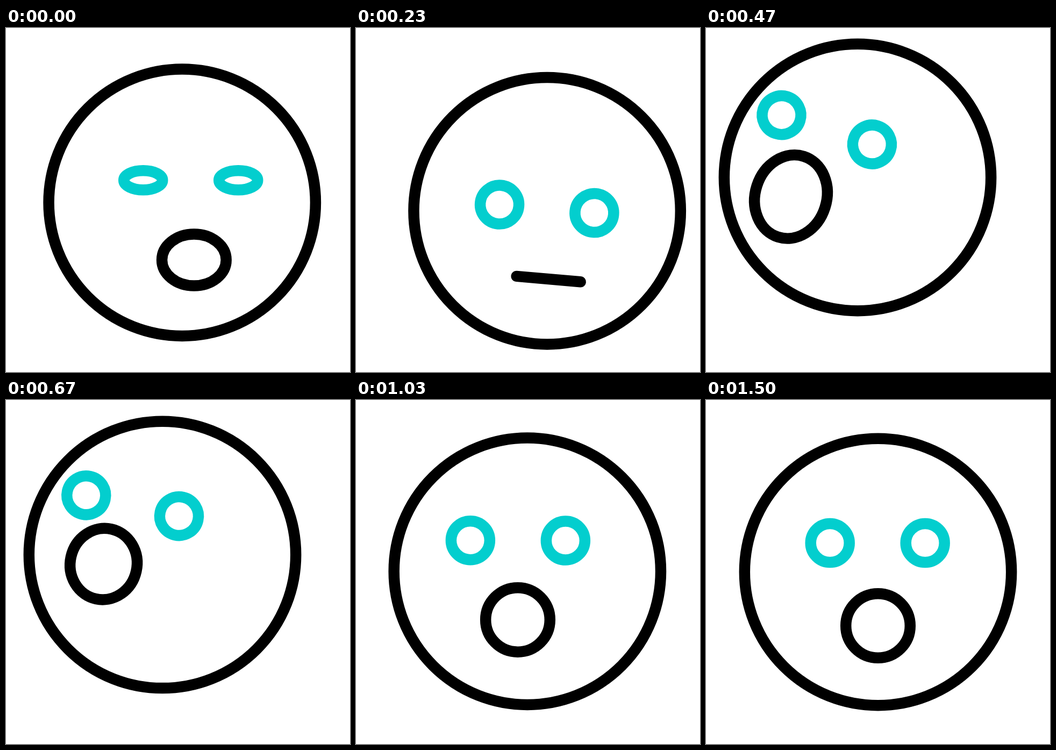
These frames come from a looping animation (640 by 640 pixels, 1.67 s). An HTML page with a canvas:

```html
<!DOCTYPE html>
<html lang="en">
<head>
<meta charset="utf-8">
<title>Yawning face</title>
<style>
html, body { margin: 0; width: 100%; height: 100%; overflow: hidden; background: #fff; }
canvas { display: block; width: 640px; height: 640px; }
</style>
</head>
<body>
<canvas id="stage"></canvas>
<script>
const LOOP = 1670, STEP = 100 / 3;
const INK = '#000', TEAL = '#03cece';
const canvas = document.getElementById('stage');
const ctx = canvas.getContext('2d');
const ratio = window.devicePixelRatio || 1;
canvas.width = canvas.height = 640 * ratio;

const clamp = v => Math.min(1, Math.max(0, v));
const smooth = u => u * u * (3 - 2 * u);
const late = power => u => 1 - (1 - u * u) ** power;

// Keys are [time, value, ease into this key]; time counts steps of 1/30 s.
function tween(k, ...keys) {
  let value = keys[0][1];
  for (let i = 1; i < keys.length; i++) {
    const [from] = keys[i - 1];
    const [to, goal, ease = smooth] = keys[i];
    value += (goal - value) * ease(clamp((k - from) / (to - from)));
  }
  return value;
}

// The head dips to the lower right, swings to the upper left and settles;
// the features follow further, each with its own lag.
function pose(k) {
  const gape = tween(k, [7, 0], [14, 1], [24, 0]);
  const shut = tween(k, [-2, 1], [5, 0], [7, 0], [14, 1]);
  return {
    headX: tween(k, [-2, 0], [5.4, 43], [14, -38], [33, 0]),
    headY: tween(k, [-2, 0], [5.4, 26.5], [14, -42], [33, 0]),
    eyesX: tween(k, [-3.9, 0], [4.8, 58], [14, -94.5], [34, 0, late(1.3)]),
    eyesY: tween(k, [-2.2, 0], [5.4, 85], [14, -76.7], [16.8, -76.7], [33.5, 0]),
    mouthX: tween(k, [-4.9, 0], [5.2, 62.5], [14, -162], [34, 0, late(1.67)]),
    mouthY: tween(k, [-2, 0], [5.2, 61], [15.8, -120], [18, -120], [34, 0]),
    mouthW: 59.8 + 6.7 * gape,
    mouthH: 59.8 * shut + 19 * gape,
    tilt: tween(k, [3.7, 0], [13.2, 18], [32, 0]) * Math.PI / 180
  };
}

// Eye opening from 0 to 1; each blink is centred on one time.
function openness(k) {
  const blinks = [1.75, 25, 41.5];
  return Math.min(...blinks.map(b => smooth(clamp(Math.abs(k - b) / 3.5))));
}

function ring(x, y, rx, ry, angle, color) {
  ctx.strokeStyle = color;
  ctx.beginPath();
  if (ry < 0.3) {
    const dx = rx * Math.cos(angle), dy = rx * Math.sin(angle);
    ctx.moveTo(x - dx, y - dy);
    ctx.lineTo(x + dx, y + dy);
  } else {
    ctx.ellipse(x, y, rx, ry, angle, 0, Math.PI * 2);
    ctx.closePath();
  }
  ctx.stroke();
}

function draw(k) {
  const p = pose(k);
  ctx.setTransform(ratio, 0, 0, ratio, 0, 0);
  ctx.fillStyle = '#fff';
  ctx.fillRect(0, 0, 640, 640);
  ctx.lineWidth = 20.5;
  ctx.lineCap = ctx.lineJoin = 'round';

  ring(320 + p.headX, 320 + p.headY, 248.2, 248.2, 0, INK);
  ring(320 + p.mouthX, 420 + p.mouthY, p.mouthW, p.mouthH, p.tilt, INK);

  const lid = 36 * openness(k);
  for (const side of [-88.5, 88.5]) {
    ring(319.2 + p.eyesX + side * Math.cos(p.tilt),
         266 + p.eyesY + side * Math.sin(p.tilt), 36, lid, p.tilt, TEAL);
  }
}

const start = performance.now();
function tick() {
  const t = (performance.now() - start) % LOOP;
  draw(Math.floor((t + 3.4) / STEP));
  requestAnimationFrame(tick);
}
tick();
</script>
</body>
</html>
```
